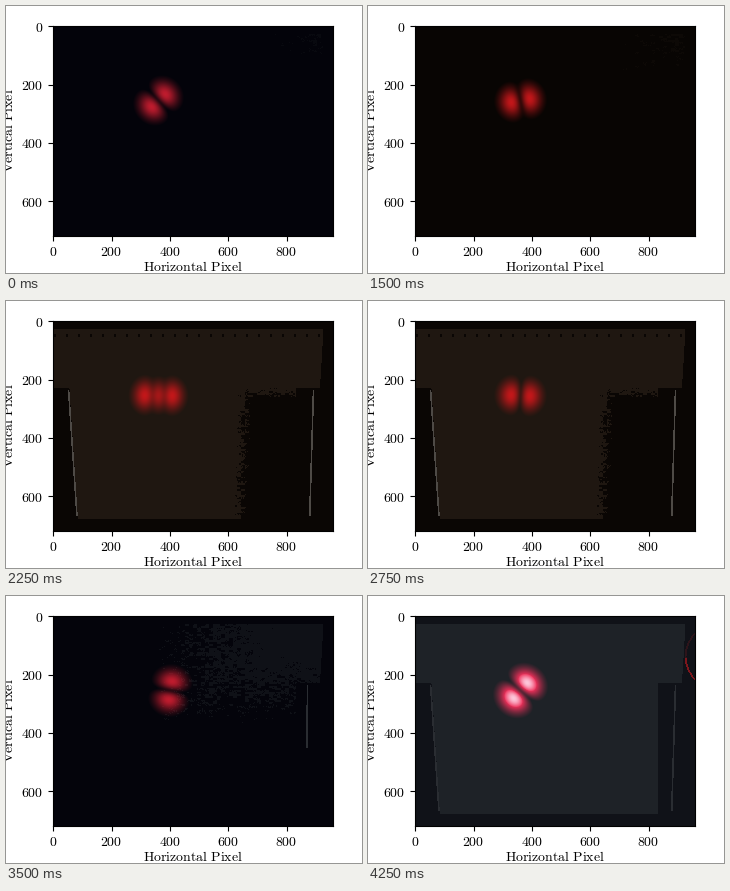
Animation, 356 px wide and 267 px high, one loop 4500 ms. Source, as a matplotlib script:

```python
import numpy as np
import matplotlib.pyplot as plt
from matplotlib.animation import FuncAnimation

W, H, DPI = 356, 267, 100
FRAMES, INTERVAL = 18, 250
LEFT, TOP, AX_W, AX_H = 47.2, 20.2, 280, 210

plt.rcParams["mathtext.fontset"] = "cm"
plt.rcParams["font.size"] = 10


def palette(black, board, rail, glow, fill):
    values = dict(black=black, board=board, rail=rail, glow=glow)
    return {k: np.array(v, float) for k, v in values.items()} | {"fill": fill}


WARM = palette((8, 5, 3), (31, 23, 17), (78, 74, 70), (194, 23, 26), .1)
COLD = palette((3, 3, 10), (30, 34, 39), (42, 45, 50), (190, 28, 46), .5)
HOT_GLOW = np.array([238, 48, 90.0])
HOT_CORE = np.array([255, 215, 232.0])

X, Y = np.meshgrid(47.0 + np.arange(AX_W), 20.0 + np.arange(AX_H))
rng = np.random.default_rng(4)
GRAIN = np.kron(rng.random((AX_H // 2, AX_W // 4)), np.ones((2, 4)))
GRAIN = .7 * GRAIN + .3 * rng.random(X.shape)


def bump(frame, centre, width):
    return np.exp(-((frame - centre) / width) ** 2)


def is_warm(frame):
    return 3 <= frame < 14


def is_bright(frame):
    return 9 <= frame < 12 or frame >= 15


def exposure_at(frame):
    if is_bright(frame):
        return 1
    return .1 + .2 * bump(frame, 4, 1.5) + .25 * bump(frame, 14, .6)


def beam(frame):
    """Hermite-Gauss modes whose dark groove makes half a turn per loop."""
    groove = np.radians(np.interp(frame, [0, 8, 11, 14, 18], [47, 90, 93, 190, 232]))
    order = bump(frame, 8, 1.3) + bump(frame, 12, .5)
    twist = .75 * bump(frame, 4, 1.5)
    waist = 14.8 if frame >= 15 else 13.5

    dx = (X - 152 - 12 * bump(frame, 14, .7)) / waist
    dy = (Y - 94) / waist
    across = dx * np.sin(groove) - dy * np.cos(groove)
    along = dx * np.cos(groove) + dy * np.sin(groove)
    envelope = np.exp(-dx ** 2 - dy ** 2)
    two_lobes = 2.33 * across
    three_lobes = 3.5 * across ** 2 - .87
    power = ((1 - order) * two_lobes) ** 2 + (order * three_lobes) ** 2
    power += (twist * 2.33 * along) ** 2 + .25 ** 2
    light = envelope * np.sqrt(power)
    return np.clip((light / light.max() - .09) / .91, 0, 1) ** .9


def post_line(x, slope, y0=88, y1=215):
    return (abs(X - x - slope * (Y - y0)) < .8) & (Y > y0) & (Y < y1)


def board_mask(exposure, shaded):
    left_edge = np.where(Y > 86, 63 + .065 * (Y - 88), 0)
    board = (Y > 27) & (Y < 218) & (X > left_edge) & (X < 317 - .06 * (Y - 28))
    board &= ~((Y > 86) & (X > 289))
    # Light falls off from the upper right corner
    falloff = np.maximum((315 - X) / 480, (Y - 28) / 290)
    board &= GRAIN < (exposure - falloff) * 4
    if shaded:
        shade = np.clip(np.minimum((X - 231 + .05 * (Y - 90)) / 16, (Y - 86) / 12), 0, 1)
        board &= GRAIN >= shade
        board &= ~((X % 12 < 2) & (abs(Y - 34) < 1.5))
    return board


def picture(frame):
    look = WARM if is_warm(frame) else COLD
    exposure, bright = exposure_at(frame), is_bright(frame)
    hot = bright and not is_warm(frame)
    span = look["board"] - look["black"]
    dark = look["black"] + span * look["fill"] * exposure ** 2
    lit = look["black"] + span * exposure ** .7
    mask = board_mask(exposure, bright and is_warm(frame))
    img = np.where(mask[..., None], lit, dark)

    if bright:
        img[post_line(62, .067) | post_line(307, -.03)] = look["rail"]
    elif exposure > .33:
        img[post_line(301, -.01, y1=152)] = look["rail"]
    if hot:
        wire = abs(X - 317 - 10 * ((Y - 60) / 24) ** 2) < 1
        img[wire & (Y > 36) & (Y < 62)] = (45, 20, 26)
        img[wire & (Y >= 62) & (Y < 85)] = (125, 22, 28)

    light = beam(frame)[..., None]
    weight = np.minimum(light * 1.5, 1) if hot else light
    img += ((HOT_GLOW if hot else look["glow"]) - img) * weight
    if hot:
        img += (HOT_CORE - img) * np.clip((light - .6) / .4, 0, 1) * .9
    return np.clip(img, 0, 255).astype(np.uint8)


def roman(words):
    return r"$\mathrm{%s}$" % words.replace(" ", r"\ ")


fig = plt.figure(figsize=(W / DPI, H / DPI), dpi=DPI, facecolor="white")
ax = fig.add_axes([LEFT / W, 1 - (TOP + AX_H) / H, AX_W / W, AX_H / H],
                  facecolor="black")
image = ax.imshow(picture(0), extent=(0, 960, 720, 0),
                  interpolation="nearest", aspect="auto")
xticks, yticks = range(0, 801, 200), range(0, 601, 200)
ax.set_xticks(xticks, [roman(str(v)) for v in xticks])
ax.set_yticks(yticks, [roman(str(v)) for v in yticks])
ax.tick_params(axis="x", pad=3)
label = dict(ha="center", va="baseline", rotation_mode="anchor")
fig.text(187 / W, 1 - 265 / H, roman("Horizontal Pixel"), **label)
fig.text(7.5 / W, 1 - 124.5 / H, roman("Vertical Pixel"), rotation=90, **label)


def update(frame):
    image.set_data(picture(frame))
    return [image]


anim = FuncAnimation(fig, update, frames=FRAMES, interval=INTERVAL, repeat=True)
plt.show()
```
